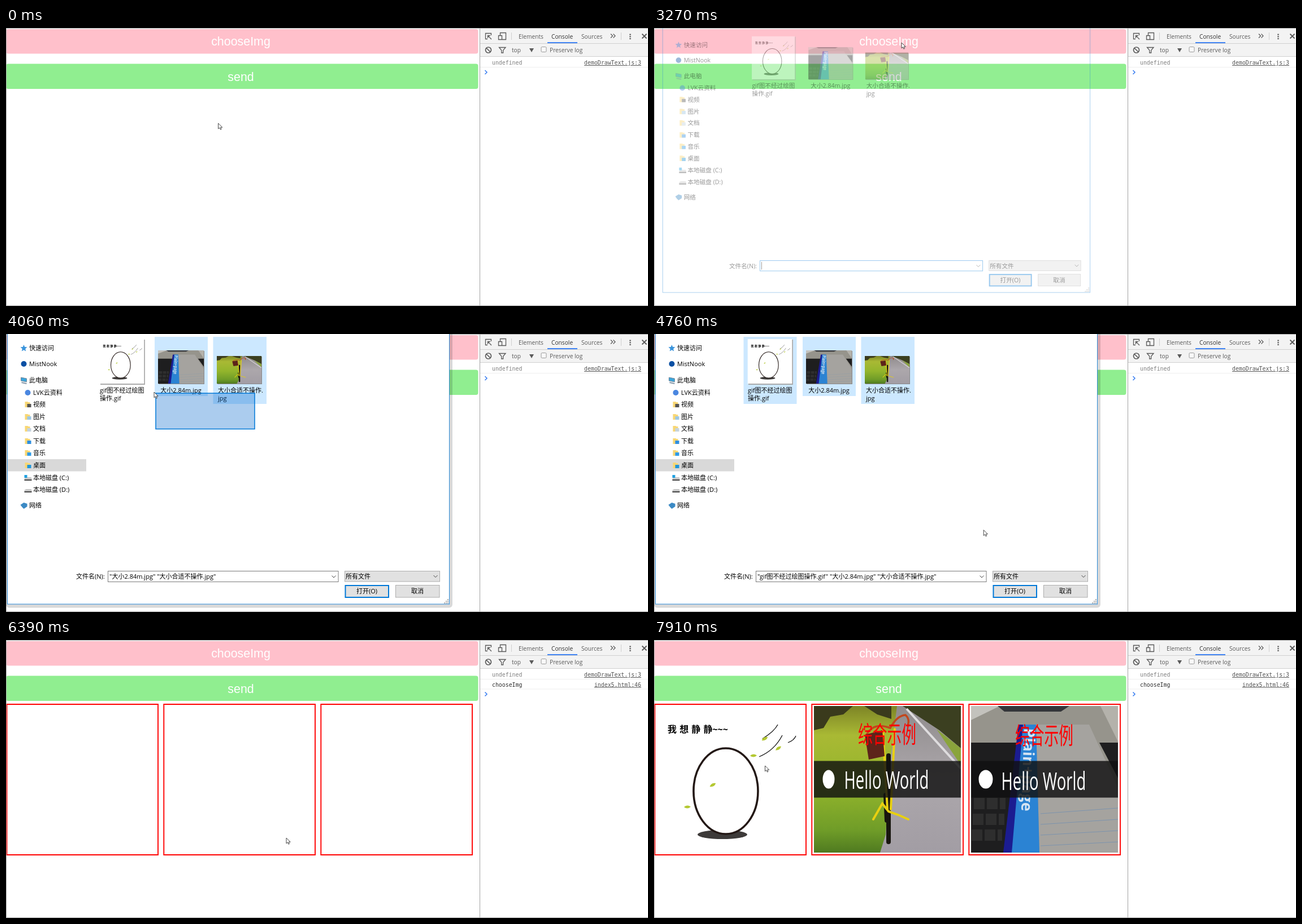
Animation, 1136 px wide and 493 px high, one loop 8000 ms. Source, as an HTML page:

```html
<!DOCTYPE html>
<html lang="zh">
<head>
<meta charset="utf-8">
<title>Image upload demo</title>
<style>
html, body { margin: 0; width: 100%; height: 100%; overflow: hidden; background: #fff; }
svg.stage { display: block; width: 100vw; height: 100vh; }
text { font-family: "Open Sans", "Noto Sans CJK SC", sans-serif; white-space: pre; }
.button { font: 21.4px "Liberation Sans", Arial, sans-serif; fill: #fff; text-anchor: middle; }
.tools text { font-size: 10.2px; fill: #5a5a5a; }
.tools .log { font: 9.87px "DejaVu Sans Mono", monospace; fill: #303030; }
.tools .dim { fill: #808080; }
.tools .link { text-anchor: end; text-decoration: underline; fill: #545454; }
.icon { fill: none; stroke: #5a5a5a; stroke-width: 1.3; }
.rule { stroke: #efefef; }
.dialog text { font-size: 11px; fill: #000; }
.mid { text-anchor: middle; }
.control { fill: #e1e1e1; stroke: #adadad; }
.chevron { fill: none; stroke: #444; }
.slot { fill: none; stroke: #f00; stroke-width: 1.9; }
.wind { fill: none; stroke: #111; stroke-width: 1.3; }
.caption { font-size: 41.5px; fill: #f00; }
.hello { font-size: 44.3px; fill: #fff; }
</style>
</head>
<body>
<svg class="stage" viewBox="0 0 1136 493" preserveAspectRatio="none">
  <defs>
    <symbol id="cartoon" viewBox="4 117 260 260">
      <rect x="4" y="117" width="260" height="260" fill="#fff"/>
      <ellipse cx="121" cy="345" rx="44" ry="8" fill="#3d3a39"/>
      <ellipse cx="127" cy="268" rx="57" ry="76" fill="#fff" stroke="#231815" stroke-width="3.6"/>
      <text id="mood" x="24" y="164" font-size="16" font-weight="700" word-spacing="1">我 想 静 静~~~</text>
      <path id="gust" class="wind" d="M186 207Q213 196 227 169M192 175Q213 162 219 150"/>
      <path id="farGust" class="wind" d="M237 182Q248 178 251 170"/>
      <g id="leaves" fill="#b4c832"></g>
    </symbol>

    <linearGradient id="lawn" x2="0" y2="1">
      <stop offset="0" stop-color="#7d8426"/><stop offset=".2" stop-color="#a9b934"/>
      <stop offset=".55" stop-color="#93b52c"/><stop offset=".85" stop-color="#6f9c28"/><stop offset="1" stop-color="#4f7a20"/>
    </linearGradient>
    <linearGradient id="road" x2="0" y2="1">
      <stop offset="0" stop-color="#8f8b8c"/><stop offset=".5" stop-color="#aca7ab"/><stop offset="1" stop-color="#a29da4"/>
    </linearGradient>
    <symbol id="bike" viewBox="283 117 260 260" preserveAspectRatio="none">
      <rect x="283" y="117" width="260" height="260" fill="url(#road)"/>
      <path d="M283 117H430L418 215 410 345 400 377H283Z" fill="url(#lawn)"/>
      <path d="M283 117H352L335 132 312 136 300 156 283 160ZM372 117H420V140L395 132Z" fill="#3a3a1c"/>
      <path d="M440 117H543V192L505 160Z" fill="#3b3f20"/>
      <path d="M500 158L543 192V222Z" fill="#8aa43c"/>
      <path d="M447 122L543 228" stroke="#dedcde" stroke-width="4"/>
      <g fill="none" stroke-linecap="round">
        <path d="M415 205V358M410 275L412 320" stroke="#18160f" stroke-width="8"/>
        <path d="M376 168Q388 145 418 156 430 134 445 133 453 140 449 152" stroke="#c2461c" stroke-width="3.500"/>
        <path d="M405 160L413 300M426 158L419 300M388 318L404 290 415 304 432 310 450 318" stroke="#e8d010" stroke-width="4"/>
      </g>
      <path d="M373 168L404 160 408 206 380 212Z" fill="#5d241a"/>
    </symbol>

    <symbol id="notebook" viewBox="561 117 260 260" preserveAspectRatio="none">
      <rect x="561" y="117" width="260" height="260" fill="#96948c"/>
      <path d="M561 117H612L561 142Z" fill="#c3c2bd"/>
      <path d="M735 117H790L821 180V117Z" fill="#b4b2ab"/>
      <path d="M608 117H735L720 127H620Z" fill="#34363a"/>
      <path d="M561 182H650L630 377H561ZM788 182H821V245Z" fill="#1e1e1f"/>
      <path d="M566 290H622M564 318H620M562 346H616" stroke="#2e2e2e" stroke-width="20" stroke-dasharray="19 4"/>
      <path d="M676 150H770L821 262V377H682Z" fill="#a5a39f"/>
      <path d="M684 308L821 298M684 327L821 318M684 346L821 338M684 365L821 358" stroke="#7c93ad"/>
      <path d="M645 150H655L636 377H618Z" fill="#1b1c91"/>
      <path d="M653 150H676L682 377H633Z" fill="#2b83d3"/>
      <text transform="translate(655 156) rotate(92)" font-size="27" font-weight="700" fill="#d5e4f2">Plain+page</text>
    </symbol>
  </defs>

  <rect width="1136" height="493" fill="#fff"/>
  <rect y="2" width="835.5" height="43.5" rx="4" fill="#ffc0cb"/>
  <rect y="63.5" width="835.5" height="44.5" rx="4" fill="#90ee90"/>
  <text class="button" x="415.5" y="31">chooseImg</text>
  <text class="button" x="415.5" y="93.5">send</text>

  <g id="slots">
    <g id="pictures">
      <use href="#cartoon" x="4" y="117" width="260" height="260"/>
      <use href="#bike" x="283" y="117" width="260" height="260"/>
      <use href="#notebook" x="561" y="117" width="260" height="260"/>
      <path d="M283 214.500H543V279.500H283ZM561 214.500H821V279.500H561Z" fill="#101010" opacity=".82"/>
      <ellipse cx="309" cy="247" rx="10.500" ry="16.500" fill="#fff"/>
      <ellipse cx="587" cy="247" rx="12.500" ry="16.500" fill="#fff"/>
      <g transform="translate(361 0) scale(.62 1)">
        <text class="caption" y="183.500">综合示例</text><text class="hello" x="-39.500" y="264.300">Hello World</text>
      </g>
      <g transform="translate(639 0) scale(.62 1)">
        <text class="caption" y="185">综合示例</text><text class="hello" x="-39.500" y="265.800">Hello World</text>
      </g>
    </g>
    <path class="slot" d="M1.400 114H269V381H1.400ZM279.300 114H547V381H279.300ZM557.300 114H825V381H557.300Z"/>
  </g>

  <g class="tools">
    <rect x="839" width="297" height="51" fill="#f3f3f3"/>
    <path d="M839 27.500H1136M839 50.500H1136M894.500 8V21M1088.500 8V21" stroke="#d0d0d0"/>
    <path d="M958 26H1011" stroke="#4285f4" stroke-width="2"/>
    <text x="907" y="18.500">Elements</text>
    <text x="965" y="18.500" style="fill:#333">Console</text>
    <text x="1018" y="18.500">Sources</text>
    <g class="icon">
      <path d="M852 19.500H848.500V9.500H858.500V13M852 13L859 20M852.500 18V13.500H857"/>
      <path d="M874.500 14V8.500H884.500V20.500H878M871.500 13.500H877.500V20.500H871.500Z"/>
      <path d="M1070 10.500L1073.500 14 1070 17.500M1074.500 10.500L1078 14 1074.500 17.500"/>
      <path d="M1125.500 10.500L1133.500 18.500M1133.500 10.500L1125.500 18.500" stroke-width="1.800"/>
      <circle cx="853.500" cy="39" r="5" stroke-width="1.700"/><path d="M850 35.500L857 42.500" stroke-width="1.700"/>
      <path d="M872.500 34.500H884L879.700 39.500V44H876.800V39.500Z"/>
      <rect x="947" y="33.500" width="9" height="9" rx="1.500" stroke="#999" fill="#f8f8f8" stroke-width="1"/>
    </g>
    <path d="M926 36H934L930 43Z" fill="#5a5a5a"/>
    <path d="M1104.500 10.500V20" stroke="#5a5a5a" stroke-width="2.400" stroke-dasharray="2.200 1.500"/>
    <text x="895" y="42.500">top</text>
    <text x="962" y="42.500">Preserve log</text>
    <path class="rule" d="M839 69.500H1136"/>
    <text class="log dim" x="860" y="65">undefined</text>
    <text class="log link" x="1124" y="65">demoDrawText.js:3</text>
    <g id="logged">
      <path class="rule" d="M839 87H1136"/>
      <text class="log" x="860" y="82.500">chooseImg</text>
      <text class="log link" x="1124" y="82.500">index5.html:46</text>
    </g>
    <path id="prompt" d="M847.500 75L851 78.500 847.500 82" fill="none" stroke="#367cf1" stroke-width="1.500"/>
  </g>
  <path d="M0 .5H1136M.5 0V493M0 492.500H1136M838.500 0V493" stroke="#a3a3a3" fill="none"/>

  <g id="dialog" class="dialog">
    <g id="paper">
      <rect x="0" y="-20" width="790" height="505.500" rx="6" opacity=".15"/>
      <rect x="2" y="-20" width="782" height="499" fill="#fff"/>
    </g>
    <g id="ink">
      <rect x="2.500" y="-20" width="782" height="499" fill="none" stroke="#2a8ad8"/>
      <rect id="place" x="3" y="222" width="139" height="21.500" fill="#d9d9d9"/>
      <g id="sidebar"></g>
      <g id="picked">
        <rect x="158.500" y="5" width="94" height="119"/>
        <rect x="263" y="5" width="94" height="105"/>
        <rect x="366.500" y="5" width="94.500" height="119"/>
      </g>
      <path d="M167 10H246V90H167Z" fill="#aaa"/>
      <use href="#cartoon" x="165.500" y="9" width="79" height="79"/>
      <path d="M270 30H351V89H270ZM374 40H453V89H374Z" fill="#888"/>
      <use href="#notebook" x="269" y="29" width="81" height="59"/>
      <use href="#bike" x="373" y="39" width="79" height="49"/>
      <text x="166" y="104">gif图不经过绘图</text><text x="166" y="118">操作.gif</text>
      <text class="mid" x="309.500" y="104">大小2.84m.jpg</text>
      <text x="375" y="104">大小合适不操作.</text><text x="375" y="118">jpg</text>
      <text x="124" y="434">文件名(N):</text>
      <rect id="field" x="180.500" y="420.500" width="407.500" height="19" fill="#fff"/>
      <path id="caret" d="M183.500 423V437" stroke="#000"/>
      <rect id="marked" x="182" y="422.500" height="15" fill="#0078d7"/>
      <text id="chosen" x="183" y="434"></text>
      <rect class="control" x="599.500" y="420.500" width="168" height="18.500"/>
      <text x="601" y="434">所有文件</text>
      <path class="chevron" d="M576.500 428.500L580 432 583.500 428.500M756.500 428L760 431.500 763.500 428"/>
      <rect id="open" x="600.500" y="446" width="76.500" height="21" stroke="#0078d7"/>
      <rect class="control" x="689.500" y="445.500" width="77.500" height="21.500"/>
      <text class="mid" x="638.500" y="460">打开(O)</text>
      <text class="mid" x="728" y="460">取消</text>
      <path d="M775 477H783M778 474H783M781 471H783" stroke="#aaa" stroke-width="2" stroke-dasharray="2 1"/>
      <rect id="marquee" fill="#0066cc" fill-opacity=".33" stroke="#0078d7" stroke-width="1.500"/>
    </g>
  </g>

  <path id="cursor" d="M0 0V9.800L2.300 7.800 3.900 11.200 5.500 10.400 4 7.200H7.200Z" fill="#fff" stroke="#333" stroke-width=".9"/>
</svg>
<script>
const $ = id => document.getElementById(id);
const show = (id, on) => { $(id).style.display = on ? '' : 'none'; };
const set = (id, attrs) => { for (const k in attrs) $(id).setAttribute(k, attrs[k]); };

// Sidebar icons, drawn around their own centre
const dot = color => `<circle r="5" fill="${color}"/>`;
const star = '<path d="M0-6L1.700-2 6-1.700 2.700 1.200 3.700 5.500 0 3.200-3.700 5.500-2.700 1.200-6-1.700-1.700-2Z" fill="#3a94dc"/>';
const computer = '<path d="M-5-5L5-3V3L-5 1Z" fill="#3aa5dc" stroke="#789"/><path d="M-4 4L5 6" stroke="#89a" stroke-width="2"/>';
const network = '<path d="M-6-1L0-5 6-3V2L0 6-3 3Z" fill="#3b8ac4"/>';
const folder = color => `<path d="M-5-5H0L1-4H4V5H-5Z" fill="#f8d775"/><rect x="-1" y="-1" width="7" height="6" fill="${color}"/>`;
const drive = mark => `<path d="M-6 1L-3-1H6L7 1V4H-6Z" fill="#c8c8c8"/><path d="M-6 4H7" stroke="#444" stroke-width="2"/>${mark}`;

const places = [
  ['快速访问', 41, 25, star], ['MistNook', 41, 53, dot('#0a4fa3')], ['此电脑', 41, 82, computer],
  ['LVK云资料', 48, 104, dot('#4a86e0')], ['视频', 48, 125, folder('#555')], ['图片', 48, 147, folder('#9cc7e4')],
  ['文档', 48, 168, folder('#c5d3de')], ['下载', 48, 190, folder('#2f8fe0')], ['音乐', 48, 211, folder('#2f9be8')],
  ['桌面', 48, 233, folder('#1e96dc')], ['本地磁盘 (C:)', 48, 255, drive('<rect x="-6" y="-5" width="5" height="5" fill="#1fa0e0"/>')],
  ['本地磁盘 (D:)', 48, 276, drive('')], ['网络', 41, 304, network]
];
$('sidebar').innerHTML = places.map(([label, x, y, icon]) =>
  `<g transform="translate(${x - 9.5} ${y})">${icon}</g><text x="${x}" y="${y + 4}">${label}</text>`).join('');

$('leaves').innerHTML = [[196, 175], [176, 205], [220, 192], [104, 257], [59, 296]].map(([x, y], i) =>
  `<path transform="translate(${x} ${y}) rotate(${[-20, 8, -25, -20, 8][i]})" d="M-6 1Q-1-5 6-1Q1 5-6 1"/>`).join('');

// Linear interpolation over [time, ...values]
function track(keys, t) {
  let i = keys.length - 1;
  while (i > 0 && t < keys[i][0]) i--;
  const a = keys[i], b = keys[i + 1];
  if (!b) return a.slice(1);
  const u = Math.max(0, (t - a[0]) / (b[0] - a[0]));
  return a.slice(1).map((v, n) => v + (b[n + 1] - v) * u);
}

const pointer = [
  [0, 375.6, 169], [680, 376, 169], [960, 376, 169], [1110, 421, 166], [1230, 403, 164],
  [1350, 403, 164], [1570, 436, 172], [1690, 436, 172], [1950, 338, 178], [2200, 469, 170],
  [2230, 469, 170], [2490, 445, 92], [2510, 445, 92], [2690, 440, 15], [2780, 438, 26],
  [3430, 438, 26], [3650, 437, 166], [3720, 437, 166], [4060, 262, 103], [4100, 262, 103],
  [4230, 205, 90], [4400, 205, 90], [4620, 420, 250], [4880, 721, 430], [5060, 640, 452],
  [5190, 626, 447], [5310, 626, 447], [5660, 495, 353], [5860, 495, 353], [5940, 496, 351],
  [6950, 496, 351], [7770, 196.5, 223]
];
// time, scale, ink opacity, paper opacity
const fade = [
  [3240, .955, .2, 0], [3270, .967, .4, .02], [3349, .967, .4, .02], [3350, .985, .75, .75],
  [3430, 1, 1, 1], [5259, 1, 1, 1], [5260, .99, .74, .74], [5310, .99, .74, .74],
  [5311, .97, .4, .4], [5420, .92, 0, 0]
];
const files = ['gif图不经过绘图操作.gif', '大小2.84m.jpg', '大小合适不操作.jpg'];
const reach = [[252, 124], [357, 110], [461, 124]];
const start = { x: 440, y: 168.5 };
const DRAG = 3720, RELEASE = 4420, HOVER = 4990, PRESS = 5150;

function drawDialog(t, x, y) {
  const visible = t >= 3240 && t < 5420;
  show('dialog', visible);
  if (!visible) return;
  const [scale, ink, paper] = track(fade, t);
  set('dialog', { transform: `translate(394 177) scale(${scale}) translate(-394 -177)` });
  set('ink', { opacity: ink });
  set('paper', { opacity: paper });

  const dragging = t >= DRAG && t < RELEASE, pressed = t >= PRESS;
  const left = t < RELEASE ? x + 3 : 208, top = t < RELEASE ? y + 2 : 92;
  const picked = reach.map(([right, bottom]) => t >= DRAG && left < right && top < bottom);
  [...$('picked').children].forEach((box, i) => {
    box.style.display = picked[i] ? '' : 'none';
    box.setAttribute('fill', pressed ? '#d9d9d9' : '#cce8ff');
  });
  show('marquee', dragging);
  if (dragging) set('marquee', { x: left, y: top, width: Math.max(0, start.x - left), height: Math.max(0, start.y - top) });

  const names = files.filter((_, i) => picked[i]);
  $('chosen').textContent = names.length > 1 ? names.map(n => `"${n}"`).join(' ') : names.join('');
  $('chosen').style.fill = pressed ? '#fff' : '#000';
  show('marked', pressed);
  if (pressed) set('marked', { width: $('chosen').getComputedTextLength() + 4 });
  show('place', t >= 3350);
  show('caret', t < DRAG);
  set('field', { stroke: t < DRAG ? '#0078d7' : '#7a7a7a' });
  set('open', { fill: pressed ? '#cce4f7' : t >= HOVER ? '#e5f1fb' : '#e1e1e1', 'stroke-width': t >= HOVER ? 1 : 2 });
}

function drawCartoon(t) {
  const step = t < 6610 ? 0 : (Math.floor((t - 6610) / 185) + 1) % 4;
  set('leaves', { transform: `translate(${-14 * step} ${7 * step})` });
  set('gust', { transform: `translate(${-3 * step} ${2 * step})` });
  set('mood', { y: 164 + step % 2 });
  show('farGust', step === 0);
}

function draw(now) {
  const t = now % 8000;
  const [x, y] = track(pointer, t);
  set('cursor', { transform: `translate(${x} ${y})` });
  drawDialog(t, x, y);
  drawCartoon(t);
  const loaded = t >= 6390;
  show('slots', loaded);
  show('logged', loaded);
  show('pictures', t >= 6450);
  set('prompt', { transform: `translate(0 ${loaded ? 17.5 : 0})` });
  requestAnimationFrame(draw);
}
draw(performance.now());
</script>
</body>
</html>
```
